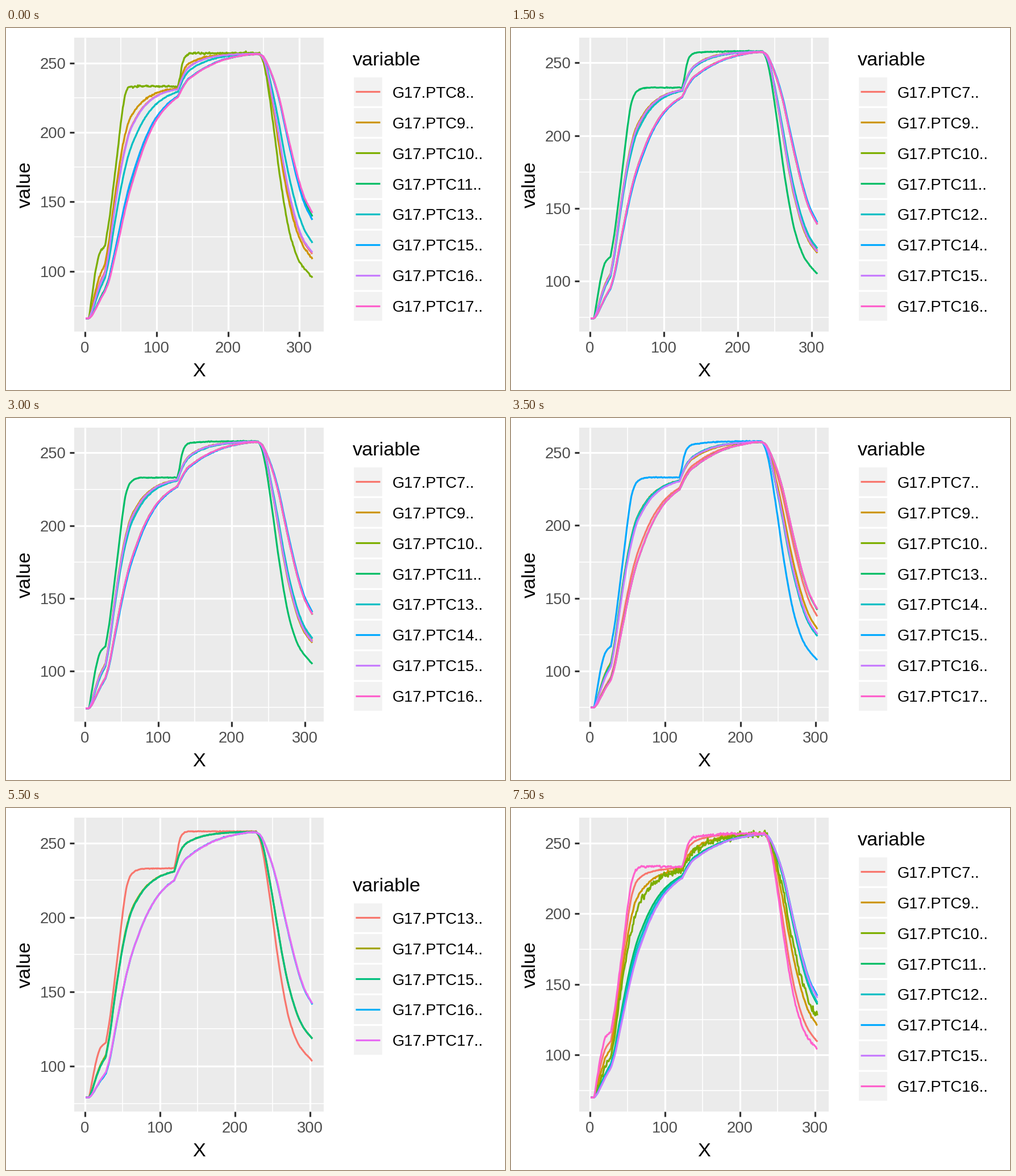
These frames come from a looping animation (878x638 px, 8 s). A matplotlib script:

```python
import numpy as np
import matplotlib.pyplot as plt
from matplotlib.animation import FuncAnimation
from matplotlib.patches import Rectangle

plt.rcParams["font.family"] = ["Liberation Sans", "DejaVu Sans"]
W, H, DPI = 878, 638, 80
LEFT, RIGHT, TOP, BOTTOM = 120.2, 559, 16.5, 535.3
PT = 72 / DPI
LINE, THIN = 3.2 * PT, 1.6 * PT
BIG, SMALL = 34.3 * PT, 27.4 * PT
HUES = {
    5: "#F8766D #A3A500 #00BF7D #00B0F6 #E76BF3".split(),
    8: "#F8766D #CD9600 #7CAE00 #00BE67 #00BFC4 #00A9FF #C77CFF #FF61CC".split(),
}

# Typical slow, medium and fast sensors in each phase of the run
WARM_T = [1, 5, 9, 15, 21, 28]
WARM = np.array([[0, 0, .08, .35, .66, 1],
                 [0, 0, .14, .47, .76, 1],
                 [0, 0, .25, .66, .91, 1]])
RISE_T = [28, 33, 40, 46, 52, 56, 62, 70, 80, 90, 100, 115, 130, 145]
RISE = np.array([
    [88, 94, 108, 121, 135, 144, 156, 170, 186, 199, 209, 219, 225.5, 229],
    [105, 119, 145, 165, 182, 191, 202, 210.5, 218.5, 223.5, 227, 230, 231.5, 232],
    [117, 132, 160, 185, 210, 222, 229.5, 232.3, 233, 233, 233, 233, 233, 233]])
SOAK_T = [0, 3, 6, 10, 15, 20, 30, 45, 60, 80, 105, 125]
SOAK = np.array([[0, .1, .2, .31, .42, .48, .6, .74, .85, .94, 1, 1],
                 [0, .17, .32, .48, .61, .69, .8, .9, .95, .985, 1, 1],
                 [0, .28, .66, .9, .98, 1, 1, 1, 1, 1, 1, 1]])
COOL_T = [0, .06, .12, .26, .37, .48, .59, .75, .86, 1]
COOL = np.array([[0, .01, .04, .15, .27, .43, .59, .8, .91, 1],
                 [0, .02, .06, .25, .42, .595, .737, .886, .95, 1],
                 [0, .03, .09, .315, .52, .69, .82, .926, .963, 1]])


def blend(table, speed):
    i = 0 if speed <= 1 else 1
    return table[i] + (table[i + 1] - table[i]) * (speed - i)


def smooth(x, xs, ys):
    """Monotone cubic through a few points."""
    xs, ys = np.asarray(xs, float), np.asarray(ys, float)
    h, d = np.diff(xs), np.diff(ys) / np.diff(xs)
    a, b = d[:-1], d[1:]
    same = a * b > 0
    inner = np.where(same, 2 * a * b / np.where(same, a + b, 1), 0)
    m = np.concatenate([[d[0]], inner, [d[-1]]])
    k = np.clip(np.searchsorted(xs, x, side="right") - 1, 0, len(h) - 1)
    u = np.clip((x - xs[k]) / h[k], 0, 1)
    return (ys[k] * (1 + 2 * u) * (1 - u) ** 2 + ys[k + 1] * u * u * (3 - 2 * u)
            + h[k] * u * (1 - u) * (m[k] * (1 - u) - m[k + 1] * u))


def run(n, soak, cool, lo, hi, top, sensors, start=None, noise=None, glitches=()):
    return dict(n=n, soak=soak, cool=cool, lo=lo, hi=hi, top=top, sensors=sensors,
                start=lo if start is None else start, noise=noise or {}, glitches=glitches)


def usual(labels, n, lo=74.5):
    """A run with an ordinary mix of sensor speeds."""
    speeds = (1, 1.1, .4, 2, .95, .35, 1.05, .4) if len(labels) == 8 else (2, 1.1, 1.05, .42, .4)
    sensors = [(k, s, np.interp(s, [0, 1, 2], [90, 104, 117]),
                np.interp(s, [.3, 1, 2], [142, 121, 105])) for k, s in zip(labels, speeds)]
    return run(n, round(.6 * n - 60), round(.77 * n - 3), lo, 258.3, 257.6, sensors)


def series(r, sensor, rng):
    label, speed, knee, end = sensor
    n, soak, cool, start = r["n"], r["soak"], r["cool"], r["start"]
    top = r["top"] + .4 * (speed - 1)
    late = np.interp(end - .7 * (start - 76), [104, 120, 142], [2, 1, 0])
    t = np.arange(1, n + 1.)
    rise_ys = blend(RISE, speed)

    def rise(x):
        shift = (knee - rise_ys[0]) * np.clip(1 - (x - 28) / 35, 0, 1)
        return np.minimum(smooth(x, RISE_T, rise_ys) + shift, 233.4)

    warm = start + (knee - start) * smooth(t, WARM_T, blend(WARM, min(speed, 2)))
    base = rise(np.array([float(soak)]))[0]
    hold = base + (top - base) * smooth(t - soak, SOAK_T, blend(SOAK, late))
    fall = top + (end - top) * smooth((t - cool) / (n - cool), COOL_T, blend(COOL, late))
    v = np.select([t <= 28, t <= soak, t <= cool], [warm, rise(t), hold], fall)
    v += rng.normal(0, r["noise"].get(label, .12), n) * (t > 8)
    for key, at, value in r["glitches"]:
        if key == label:
            v[at - 1] = value
    return t, v


RUNS = [
    run(318, 130, 244, 66, 259, 256.8, [
        (8, .97, 100, 112.5), (9, 1.25, 105, 109), (10, 2.15, 118.5, 95.5),
        (11, .08, 87, 139.5), (13, .65, 95, 120.5), (15, .12, 86, 137),
        (16, .95, 98, 113.5), (17, 0, 85.5, 142)], noise={10: .35, 9: .3}),
    usual(range(13, 18), 318, 78.9),
    run(276, 104, 209, 77.8, 258, 257.6, [
        (7, .8, 102, 142), (9, 1.6, 110, 121), (10, .85, 103, 138.5),
        (11, 1.9, 112, 115), (12, 1.6, 110.5, 122)], start=78.5),
    usual([7, 9, 10, 11, 12, 14, 15, 16], 308),
    usual(range(12, 17), 296, 77.5),
    run(308, 123, 233, 71.8, 258.7, 257.8, [
        (10, 1.75, 111, 108), (11, 1.3, 108, 118), (12, 1, 104, 124), (13, 2, 116, 104.5),
        (14, .3, 93, 142), (15, .98, 103, 120.5), (16, 2, 117, 105), (18, .33, 93, 141)],
        start=76, glitches=[(13, t, 72) for t in range(1, 8)] + [(16, 36, 85)]),
    usual([7, 9, 10, 11, 13, 14, 15, 16], 310),
    run(302, 119, 228, 74.4, 258.2, 257.5, [
        (7, .5, 96, 137.5), (9, 1.02, 104, 129), (10, 1.1, 106, 125), (13, .38, 94.5, 142),
        (14, 1.08, 104.5, 124), (15, 2, 117, 107.5), (16, .98, 103, 125.5),
        (17, .38, 94, 142.5)], start=75),
    usual(range(10, 18), 296),
    run(322, 131, 243, 74.3, 261.5, 259.3, [
        (7, 1.25, 108, 113), (9, .15, 93, 139), (10, .2, 94, 138.5), (11, .78, 99, 120),
        (12, 2.1, 119.5, 100), (14, 1.05, 104, 114.5), (15, .18, 92, 136.5), (16, 0, 90, 143)],
        start=75, noise={7: .3},
        glitches=[(7, 93, 221), (7, 94, 208), (7, 97, 88), (7, 98, 160)]
        + [(12, t, 259.6 + 1.8 * np.sin(np.pi * (t - 150) / 20)) for t in range(150, 171)]),
    usual([7, 9, 10, 11, 12, 13, 15, 16], 308),
    run(303, 119, 228, 78.4, 258.2, 257.4, [
        (13, 1.98, 116, 103.5), (14, 1.1, 107.5, 118.5), (15, 1.07, 106.5, 118.5),
        (16, .4, 95, 141.5), (17, .4, 96, 142)], start=79),
    usual(range(13, 18), 288, 78),
    usual(range(10, 18), 302),
    usual([10, 11, 12, 13, 14, 15, 16, 18], 312),
    run(303, 123, 233, 69.4, 258.7, 256.3, [
        (7, 1.75, 110, 109.5), (9, 1.3, 105, 121), (10, 1, 99, 127), (11, .5, 94, 136),
        (12, .4, 93, 137), (14, .3, 92, 142), (15, .28, 91, 140.5), (16, 2.05, 117, 104)],
        start=70, noise={16: .4, 10: 1.3, 9: .4}),
]

fig = plt.figure(figsize=(W / DPI, H / DPI), dpi=DPI, facecolor="white")
ax = fig.add_axes([0, 0, 1, 1])


def line(xs, ys, color, width=LINE):
    ax.plot(xs, ys, color=color, lw=width, solid_capstyle="butt", solid_joinstyle="round")


def text(x, y, s, size=SMALL, color="black", **kw):
    ax.text(x, y, s, fontsize=size, color=color, va="baseline", **kw)


def box(x0, y0, x1, y1, **kw):
    ax.add_patch(Rectangle((x0, y0), x1 - x0, y1 - y0, **kw))


def draw_axes(px, py):
    box(LEFT, TOP, RIGHT, BOTTOM, fc="#EBEBEB", ec="none")
    xs = [v for v in range(0, 400, 50) if LEFT < px(v) < RIGHT]
    ys = [v for v in range(25, 300, 25) if TOP < py(v) < BOTTOM]
    for minor in (True, False):
        width = THIN if minor else LINE
        for v in xs:
            if bool(v % 100) == minor:
                line([px(v)] * 2, [TOP, BOTTOM], "white", width)
        for v in ys:
            if bool(v % 50) == minor:
                line([LEFT, RIGHT], [py(v)] * 2, "white", width)
    for v in xs:
        if v % 100 == 0:
            line([px(v)] * 2, [BOTTOM, BOTTOM + 8.6], "#333333")
            text(px(v), 572, str(v), color="#4D4D4D", ha="center")
    for v in ys:
        if v % 50 == 0:
            line([LEFT - 8.6, LEFT], [py(v)] * 2, "#333333")
            text(105.5, py(v) + 10, str(v), color="#4D4D4D", ha="right")
    text(339.5, 614, "X", BIG, ha="center")
    text(43, 276, "value", BIG, rotation=90, rotation_mode="anchor", ha="center")


def draw_legend(labels, hues):
    step = 53.9
    first = 301 - step * (len(labels) - 1) / 2
    text(609.5, first - 46, "variable", BIG)
    for i, (label, hue) in enumerate(zip(labels, hues)):
        y = first + i * step
        box(609.5, y - step / 2, 663.4, y + step / 2, fc="#F2F2F2", ec="white", lw=LINE)
        line([615, 658], [y, y], hue)
        text(680, y + 10.5, f"G17.PTC{label}..")


def draw(i):
    ax.clear()
    ax.set(xlim=(0, W), ylim=(H, 0), autoscale_on=False)
    ax.axis("off")
    r = RUNS[i]
    rng = np.random.default_rng(i + 1)
    pad_x, pad_y = (RIGHT - LEFT) / 22, (BOTTOM - TOP) / 22

    def px(t):
        return LEFT + pad_x * (1 + 20 * (t - 1) / (r["n"] - 1))

    def py(v):
        return BOTTOM - pad_y * (1 + 20 * (v - r["lo"]) / (r["hi"] - r["lo"]))

    draw_axes(px, py)
    hues = HUES[len(r["sensors"])]
    for sensor, hue in zip(r["sensors"], hues):
        t, v = series(r, sensor, rng)
        line(px(t), py(v), hue)
    draw_legend([s[0] for s in r["sensors"]], hues)
    return ax.get_children()


anim = FuncAnimation(fig, draw, frames=len(RUNS), interval=500, repeat=True,
                     repeat_delay=0, init_func=lambda: [])
plt.show()
```
